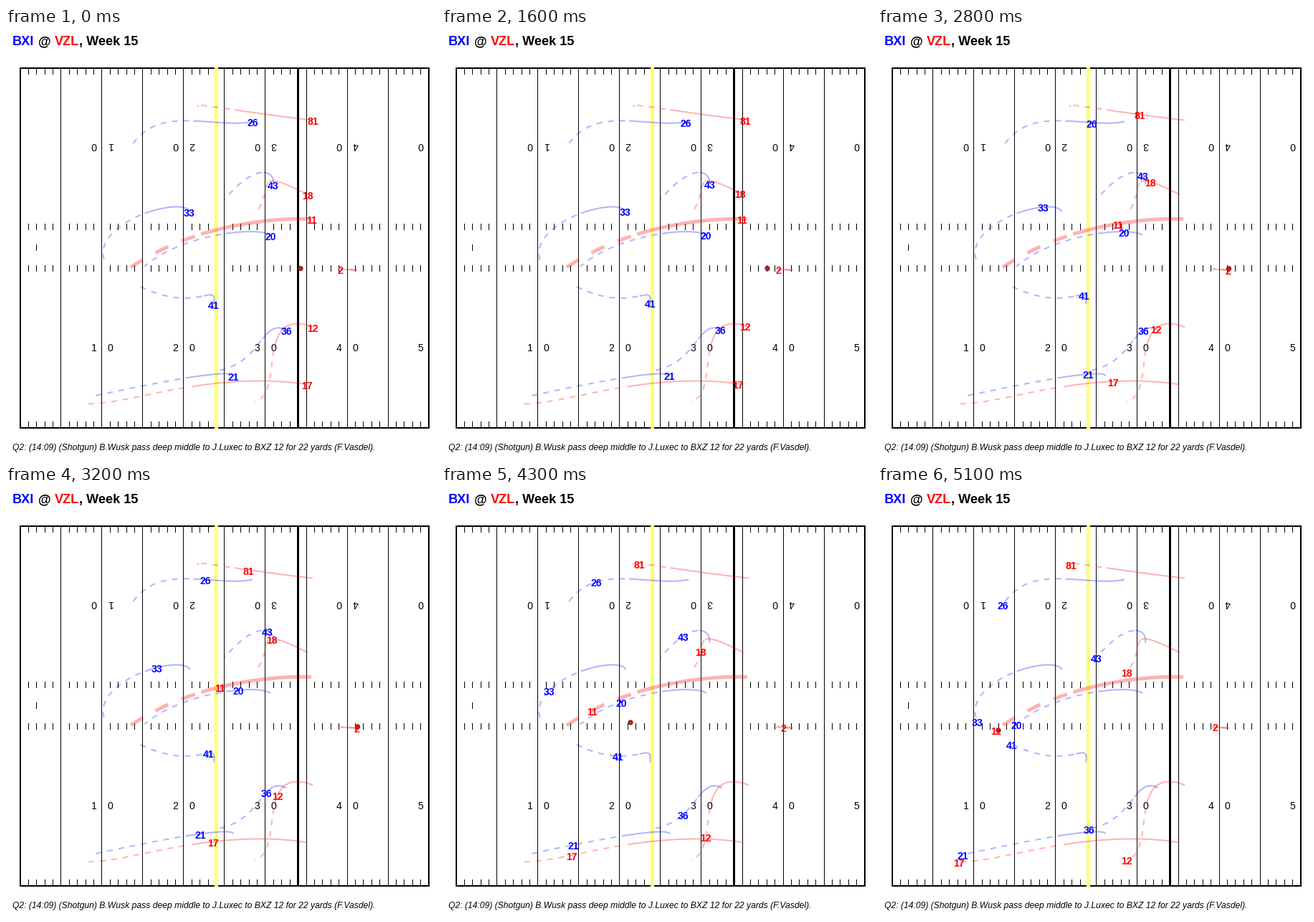
These frames come from a looping animation (600x600 px, 6200 ms). A matplotlib script:

```python
import math

import numpy as np
import matplotlib.pyplot as plt
from matplotlib.animation import FuncAnimation

SIZE, DPI = 600, 100
PX = 72 / DPI                 # one pixel in points
FRAMES, LAST = 62, 51         # the last pose is held
START, SNAP, THROW, CATCH = 12, 14, 35, 46
KNOTS = np.array([26, 38, LAST])
BLUE, RED = "#0000ff", "#ff0000"
YARD, GOAL_X = 11.406, 19.8

# Route of each player: stance, then the spot reached at each knot.
DEFENSE = {
    26: [(344, 132), (308, 134), (244, 131), (174, 167)],
    43: [(373, 220), (371, 209), (352, 204), (305, 241)],
    33: [(256, 258), (238, 251), (176, 268), (139, 330)],
    20: [(369, 291), (351, 286), (287, 292), (193, 334)],
    41: [(290, 387), (289, 375), (267, 377), (187, 362)],
    36: [(391, 423), (374, 421), (351, 444), (294, 480)],
    21: [(317, 487), (301, 484), (227, 494), (118, 516)],
}
OFFENSE = {
    81: [(428, 130), (378, 124), (300, 113), (269, 111)],
    18: [(421, 234), (386, 218), (364, 220), (347, 261)],
    11: [(426, 268), (352, 272), (247, 298), (164, 342)],
    2: [(466, 338), (486, 339), (484, 339), (470, 337)],
    12: [(428, 419), (393, 417), (372, 462), (347, 523)],
    17: [(420, 499), (346, 494), (229, 507), (113, 526)],
}


def run(route):
    """Quartic path that leaves the stance at rest and meets every knot."""
    stance, *spots = np.array(route, float)

    def basis(t):
        s = np.clip((t - START) / (LAST - START), 0, 1)
        return np.stack([s ** 2, s ** 3, s ** 4], axis=1)

    coef = np.linalg.solve(basis(KNOTS), np.array(spots) - stance)
    return stance + basis(np.arange(LAST + 1)) @ coef


def throw_ball(passer, catcher):
    """Ball position at every step: rest, snap, held, in the air, caught."""
    path = []
    for i in range(LAST + 1):
        if i < SNAP + 3:
            pos = 411 + 21.5 * max(0, i - SNAP), 335.5
        elif i < THROW:
            pos = passer[i] + (1.5, -3.3)
        elif i < CATCH:
            pos = 475 - 26.5 * (i - THROW), 332 - 0.25 * (i - THROW)
        else:
            pos = catcher[i] + (4, -1)
        path.append(pos)
    return np.array(path, float)


fig = plt.figure(figsize=(SIZE / DPI, SIZE / DPI), dpi=DPI, facecolor="white")
ax = fig.add_axes([0, 0, 1, 1])
ax.set_xlim(0, SIZE)
ax.set_ylim(SIZE, 0)
ax.axis("off")


def write(x, y, s, px, **kw):
    return ax.text(x, y, s, fontsize=px * PX, family="Liberation Sans",
                   va="baseline", **kw)


def line(xs, ys, px, color="black", **kw):
    ax.plot(xs, ys, color=color, lw=px * PX, solid_capstyle="butt",
            dash_capstyle="butt", snap=False, **kw)


def upright(x, top, bottom, px=1, color="black"):
    line([x, x], [top, bottom], px, color, zorder=1)


def yard_x(n):
    return math.floor(GOAL_X + n * YARD) + 0.5


def draw_field():
    for n in range(1, 50):
        if n % 5 == 0:
            upright(yard_x(n), 56, 558)
        else:
            for top in (56, 273, 331, 549):
                upright(yard_x(n), top, top + 9)
    upright(yard_x(2), 302, 311)

    for n in range(10, 51, 10):
        for digit, side in zip(str(n), (-1, 1)):
            # The far row is the near row turned upside down.
            for y, flip, turn in ((451, 1, 0), (160, -1, 180)):
                x = GOAL_X + (n + side * flip) * YARD
                if x < 590:
                    write(x, y, digit, 14, ha="center", rotation=turn,
                          rotation_mode="anchor", zorder=1)

    ax.add_patch(plt.Rectangle((20, 56), 570, 502, fill=False, ec="black",
                               lw=2 * PX, joinstyle="miter", zorder=1))
    upright(407.5, 55, 559, 3)
    upright(293.5, 54, 559, 5, "#ffff70")


def draw_trail(path, color, px):
    x, y = path[:, 0], path[:, 1] - 1.5
    style = dict(alpha=0.3, zorder=2)
    line(x[:THROW + 1], y[:THROW + 1], px, color, **style)
    line(x[THROW + 1:], y[THROW + 1:], px, color, linestyle=(0, (4, 4)), **style)


draw_field()

for x, s, color in ((9, "BXI", BLUE), (45.5, "@", "black"),
                    (68, "VZL", RED), (102.5, ", Week 15", "black")):
    write(x, 24, s, 18.2, weight="bold", color=color)
write(9, 589, "Q2: (14:09) (Shotgun) B.Wusk pass deep middle to J.Luxec "
      "to BXZ 12 for 22 yards (F.Vasdel).", 12.08, style="italic")

paths, labels = {}, {}
for team, color in ((DEFENSE, BLUE), (OFFENSE, RED)):
    for num, route in team.items():
        paths[num] = run(route)
        draw_trail(paths[num], color, 5 if num == 11 else 2)
        labels[num] = write(0, 0, str(num), 14, weight="bold", color=color,
                            ha="center", zorder=4)

ball_path = throw_ball(paths[2], paths[11])
ball = plt.Circle((0, 0), 3.2, fc="#a52a2a", ec="#7a1a1a", lw=0.8 * PX, zorder=3)
ax.add_patch(ball)


def update(i):
    i = min(i, LAST)
    for num, label in labels.items():
        x, y = paths[num][i]
        label.set_position((x, y + 5))
    ball.center = tuple(ball_path[i])
    return [*labels.values(), ball]


anim = FuncAnimation(fig, update, frames=FRAMES, init_func=lambda: update(0),
                     interval=100, repeat=True, repeat_delay=0, blit=False)
plt.show()
```
